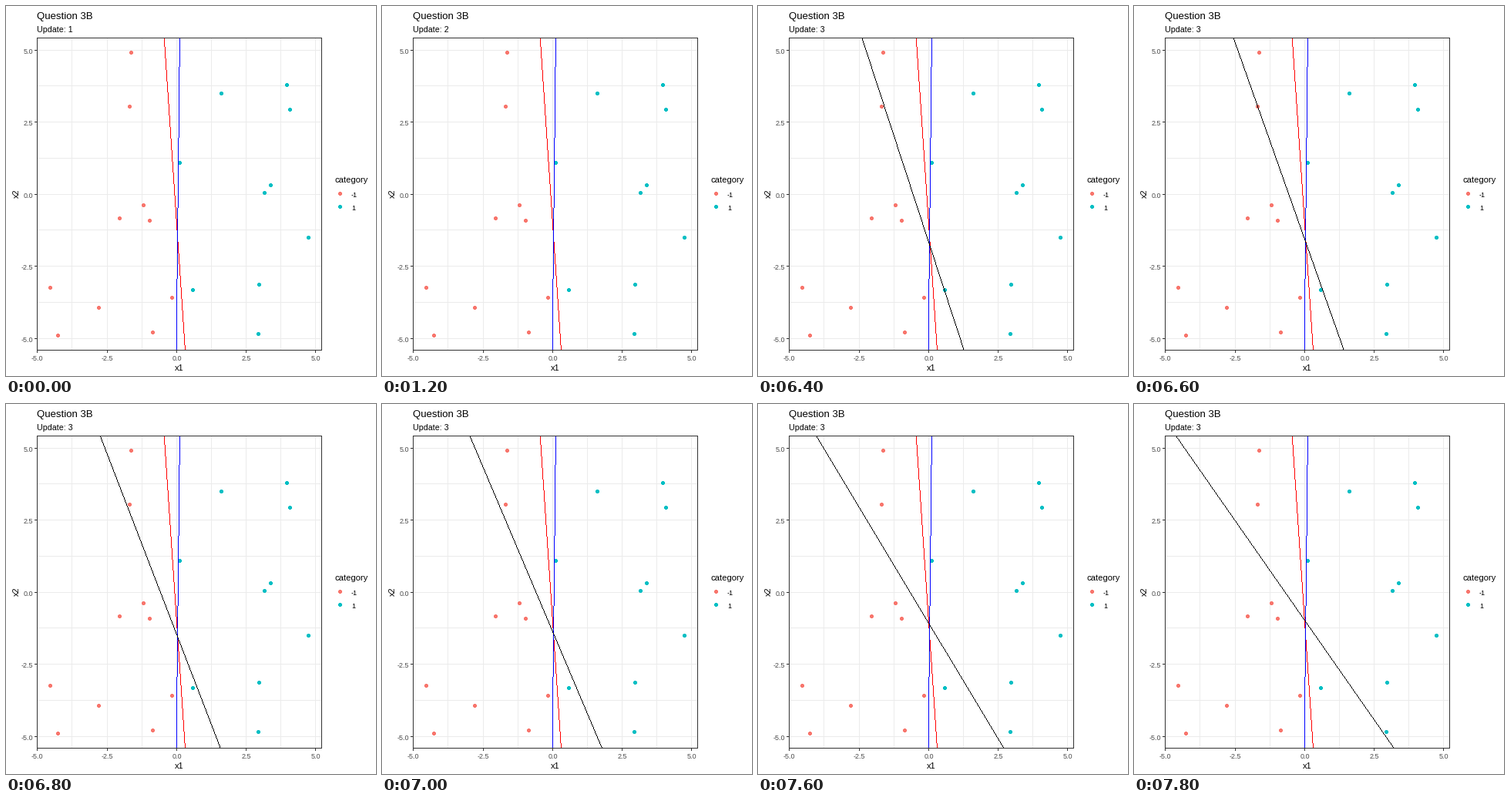
Animation of 480x480 px, one loop 8 s. Source, as a matplotlib script:

```python
import matplotlib.pyplot as plt
import numpy as np
from matplotlib.animation import FuncAnimation
from matplotlib.colors import to_rgba
from matplotlib.patches import Rectangle, RegularPolygon

SIZE, DPI = 480, 100
STEP, FRAMES = 200, 40
PX = 72 / DPI  # one pixel in points

LEFT, RIGHT, TOP, BOTTOM = 40, 409, 41, 446
X0, Y0 = 220.7, 243.64          # pixel position of the data origin
UNIT_X, UNIT_Y = 36.064, 37.392  # pixels per data unit

GRID, BORDER, TICK_TEXT = "#EBEBEB", "#333333", "#4D4D4D"
CORAL, TEAL = "#F8766D", "#00BFC4"

SAMPLES = [
    (-1.63, 4.91), (-1.68, 3.04), (-1.18, -0.38), (-2.04, -0.84),
    (-0.96, -0.92), (-4.54, -3.25), (-2.79, -3.94), (-0.16, -3.59),
    (-0.85, -4.80), (-4.26, -4.90), (3.97, 3.79), (4.08, 2.93),
    (1.62, 3.49), (0.12, 1.09), (3.39, 0.31), (3.17, 0.04),
    (4.75, -1.51), (2.98, -3.14), (0.59, -3.33), (2.95, -4.85),
]

plt.rcParams["font.family"] = "Liberation Sans"
fig = plt.figure(figsize=(SIZE / DPI, SIZE / DPI), dpi=DPI, facecolor="white")
ax = fig.add_axes([0, 0, 1, 1])


def col(v):
    return round(X0 + UNIT_X * v)


def row(v):
    return round(Y0 - UNIT_Y * v)


def bar(x, y, w, h, color, z=1):
    ax.add_patch(Rectangle((x, y), w, h, fc=color, ec="none", lw=0,
                           antialiased=False, zorder=z))


def dot(x, y, color):
    ax.add_patch(RegularPolygon((x + 0.5, y + 0.5), 4, radius=2.5, fc=color,
                                ec="none", antialiased=False, zorder=3))


def label(x, y, text, size, color="black", ha="left"):
    return ax.text(x, y, text, fontsize=size * PX, color=color, ha=ha,
                   va="baseline")


def trace(canvas, top, bottom, color):
    """Paint a one-pixel line from column top to column bottom of the panel."""
    rows = np.arange(TOP + 1, BOTTOM)
    cols = np.linspace(top, bottom, len(rows)).astype(int)
    canvas[rows, cols] = to_rgba(color)


def boundary(k):
    """Columns where the fitted line meets the panel's top and bottom."""
    slope, level = 3.305 - 0.2334 * k, 307.5 - 3.51 * k
    return [X0 + (y - level) / slope for y in (TOP + 0.5, BOTTOM)]


# grid, ticks and tick labels
for v in np.arange(-5, 5.1, 1.25):
    x, y = col(v), row(v)
    bar(x, TOP, 1, BOTTOM - TOP, GRID)
    bar(LEFT, y, RIGHT - LEFT, 1, GRID)
    if v % 2.5 == 0:
        bar(x, BOTTOM + 1, 1, 3, BORDER)
        bar(LEFT - 3, y, 3, 1, BORDER)
        label(x + 0.5, 460, f"{v:.1f}", 9, TICK_TEXT, "center")
        label(35.5, y + 4.6, f"{v:.1f}", 9, TICK_TEXT, "right")

# panel border
for x in (LEFT, RIGHT):
    bar(x, TOP, 1, BOTTOM - TOP + 1, BORDER, 8)
for y in (TOP, BOTTOM):
    bar(LEFT, y, RIGHT - LEFT + 1, 1, BORDER, 8)

for x1, x2 in SAMPLES:
    dot(col(x1), row(x2), TEAL if x1 > 0 else CORAL)

# titles and legend
label(40, 17, "Question 3B", 13.1)
update_text = label(40, 34, "", 10.6)
label(225, 473, "x1", 11, ha="center")
ax.text(18.5, 243.5, "x2", fontsize=11 * PX, rotation=90, ha="right",
        va="center")
label(426.5, 229, "category", 11.2)
for y, name, color in ((243, "-1", CORAL), (260, "1", TEAL)):
    dot(433, y, color)
    label(448, y + 5, name, 9.2)

lines = ax.imshow(np.zeros((SIZE, SIZE, 4)), extent=(0, SIZE, SIZE, 0),
                  interpolation="nearest", aspect="auto", zorder=5)
ax.set_xlim(0, SIZE)
ax.set_ylim(SIZE, 0)
ax.axis("off")


def draw(i):
    t = i * STEP
    update_text.set_text(f"Update: {1 + (t >= 1200) + (t >= 6400)}")
    canvas = np.zeros((SIZE, SIZE, 4))
    trace(canvas, 205.3, 232.4, "red")
    trace(canvas, 225.4, 221.0, "blue")
    if t >= 5000:
        trace(canvas, *boundary(max(0, (t - 6200) / STEP)), "black")
    lines.set_data(canvas)
    return lines, update_text


anim = FuncAnimation(fig, draw, frames=FRAMES, interval=STEP, repeat=True,
                     repeat_delay=0, blit=False)
plt.show()
```
